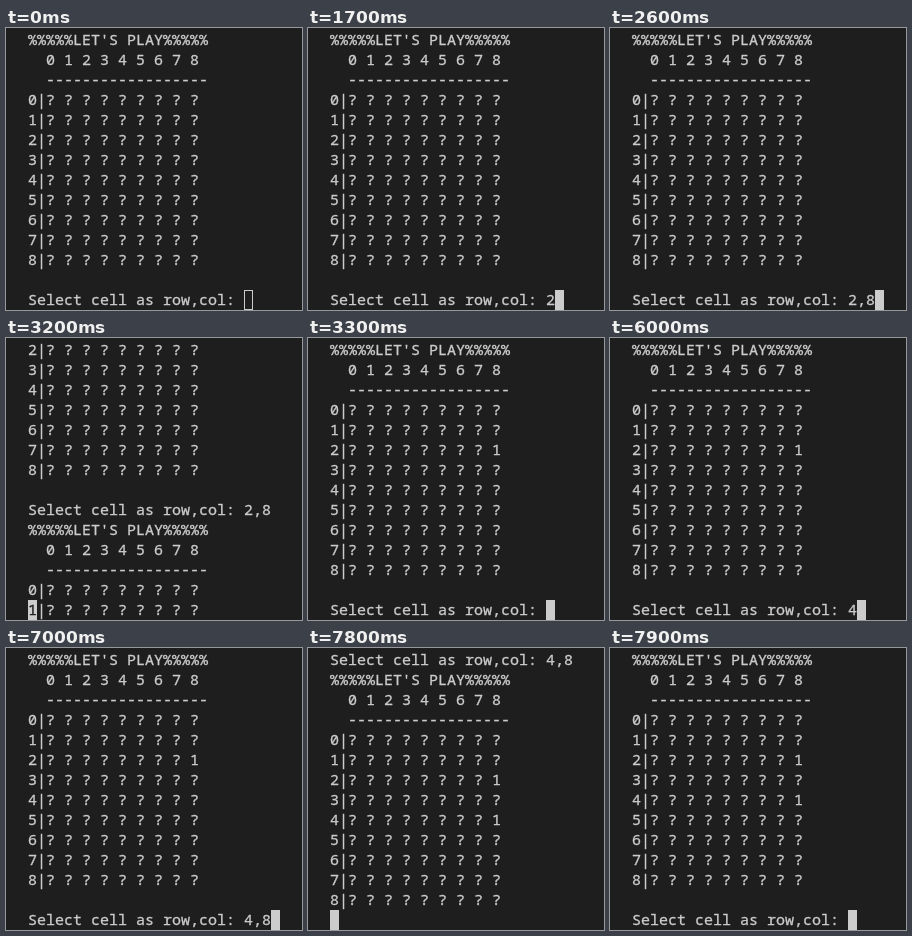
An HTML page that plays this animation: 296 by 282 pixels, repeating every 8000 ms.

```html
<!DOCTYPE html>
<html lang="en">
<head>
<meta charset="utf-8">
<title>Grid game in a terminal</title>
<style>
  html, body { margin: 0; width: 100%; height: 100%; overflow: hidden; background: #1e1e1e; }
  svg { display: block; }
  text {
    font: 15px "Noto Sans Mono", "DejaVu Sans Mono", monospace;
    fill: #ccc; stroke: #ccc; stroke-width: 0.3px;
    white-space: pre; font-variant-ligatures: none;
  }
  #under { fill: #1e1e1e; stroke: #1e1e1e; }
</style>
</head>
<body>
<svg id="stage" width="296" height="282" viewBox="0 0 296 282">
  <rect width="296" height="282" fill="#1e1e1e"/>
  <g id="rows"></g>
  <rect id="cursor" stroke="#ccc"/>
  <text id="under"></text>
</svg>
<script>
const LOOP = 8000, ROWS = 14, SIZE = 9;
const LEFT = 22, TOP = 2, CELL_W = 9, CELL_H = 20, BASE = 15;
const PROMPT = "Select cell as row,col: ";
const digits = [...Array(SIZE).keys()];

// Each step: start time, first visible line of the log, text typed at the prompt.
const steps = [
  [0, 0, ""],
  [1700, 0, "2"],
  [2000, 0, "2,"],
  [2600, 0, "2,8"],
  [3200, 5, "2,8"],
  [3300, 14, ""],
  [6000, 14, "4"],
  [6400, 14, "4,"],
  [6900, 14, "4,8"],
  [7800, 27, "4,8"],
  [7900, 28, ""]
];
const FOCUS_AT = 700;
const moves = ["2,8", "4,8"];

function board(opened) {
  const cell = (r, c) => opened.includes(r + "," + c) ? "1" : "?";
  return [
    "%%%%%LET'S PLAY%%%%%",
    "  " + digits.join(" "),
    "  " + "-".repeat(2 * SIZE),
    ...digits.map(r => r + "|" + digits.map(c => cell(r, c)).join(" ")),
    "",
    PROMPT
  ];
}

const log = [0, 1, 2].flatMap(n => board(moves.slice(0, n)));

const $ = id => document.getElementById(id);
const rows = $("rows"), cursor = $("cursor"), under = $("under");

function place(node, row, col) {
  node.setAttribute("x", LEFT + col * CELL_W);
  node.setAttribute("y", TOP + row * CELL_H + BASE);
}

const lines = Array.from({ length: ROWS }, (_, row) => {
  const node = document.createElementNS("http://www.w3.org/2000/svg", "text");
  place(node, row, 0);
  return rows.appendChild(node);
});

function setCursor(col, filled, char) {
  const box = {
    x: LEFT + col * CELL_W + 0.5,
    y: TOP + (ROWS - 1) * CELL_H + 0.5,
    width: CELL_W - 1,
    height: CELL_H - 1,
    fill: filled ? "#ccc" : "none"
  };
  for (const key in box) cursor.setAttribute(key, box[key]);
  place(under, ROWS - 1, col);
  under.textContent = char;
}

function render(time) {
  const [, top, typed] = steps.filter(step => step[0] <= time).pop();
  const shown = log.slice(top, top + ROWS)
    .map(line => line === PROMPT ? line + typed : line);
  lines.forEach((node, row) => { node.textContent = shown[row]; });

  const last = shown[ROWS - 1];
  const col = last.startsWith(PROMPT) ? last.length : 0;
  setCursor(col, time >= FOCUS_AT, last[col] || "");
}

const start = performance.now();
function tick() {
  render((performance.now() - start) % LOOP);
  requestAnimationFrame(tick);
}
tick();
</script>
</body>
</html>
```
